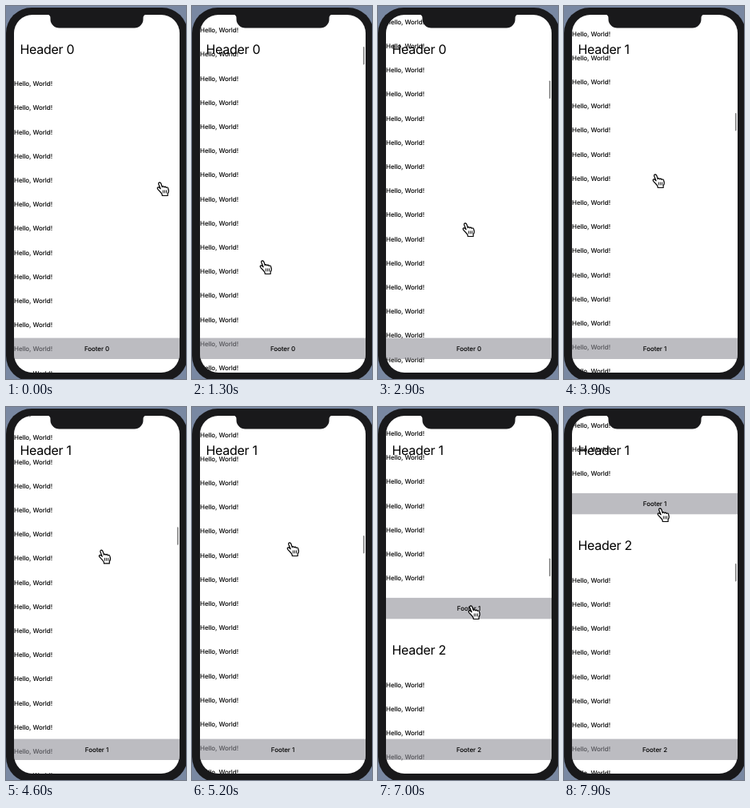
An HTML page with a canvas for the animation above (8000 ms loop, 225 px wide and 467 px high).

```html
<!DOCTYPE html>
<html lang="en">
<head>
<meta charset="utf-8">
<title>Sticky section list</title>
<style>
html, body { margin: 0; width: 225px; height: 467px; overflow: hidden; background: #7988a2; }
canvas { display: block; }
</style>
</head>
<body>
<canvas id="stage" width="225" height="467"></canvas>
<script>
const c = document.getElementById('stage').getContext('2d');
const LOOP = 8000, ROW = 30.2, ROWS = 50, SECTION = ROW * ROWS + 103.3;
const HEADER_Y = 53.3, FOOTER_Y = 429;

// Key poses; the motion between them is smooth
const poses = [
  { t: 0, scroll: 0, x: 196.5, y: 229.5 },
  { t: 800, scroll: 0, x: 95, y: 390 },
  { t: 1300, scroll: 187.8, x: 92.5, y: 327.5 },
  { t: 2900, scroll: 1043.8, x: 113.5, y: 280.5 },
  { t: 3900, scroll: 1857.2, x: 118.5, y: 219.5 },
  { t: 5200, scroll: 2400.8, x: 126.5, y: 178.5 },
  { t: 7000, scroll: 2976.1, x: 120.5, y: 257.5 },
  { t: 7900, scroll: 3107.1, x: 124.5, y: 135.5 }
];

// Cubic interpolation of one property, with central-difference slopes
function at(key, t) {
  const last = poses.length - 1;
  const slope = i => {
    const a = poses[Math.max(0, i - 1)], b = poses[Math.min(last, i + 1)];
    return (b[key] - a[key]) / (b.t - a.t);
  };
  const i = poses.findLastIndex(p => p.t <= t);
  if (i === last) return poses[last][key];
  const p = poses[i], q = poses[i + 1], d = q.t - p.t, u = (t - p.t) / d, v = 1 - u;
  return v * v * (1 + 2 * u) * p[key] + u * u * (3 - 2 * u) * q[key]
    + d * u * v * (v * slope(i) - u * slope(i + 1));
}

function box(x, y, w, h, r) {
  const path = new Path2D();
  path.roundRect(x, y, w, h, r);
  return path;
}

const phone = box(0, 2, 227, 468, 32);
const screen = box(10, 11, 207, 448, 23);
const notch = box(55.5, 5, 116, 22.5, [0, 0, 11, 11]);
notch.addPath(new Path2D('M51.5 10.5 H175.5 Q171.5 11 171.5 15 H55.5 Q55.5 11 51.5 10.5 Z'));
const hand = new Path2D('M-2.5 4.5 L-6.8 -.2 Q-8 -2.2 -6.2 -2.6 Q-5 -2.8 -3.4 -.7 L-5.8 -6.6 Q-6 -8.6 -4.4 -8.7 Q-3.2 -8.7 -2.7 -7.2 L-1.2 -2.8 Q-.2 -5 1.2 -2.6 Q2.6 -4.6 3.7 -2 Q5.6 -3.4 6.2 -1 Q7.6 2.6 5.6 5.4 V8 H-1.2 Q-1 6.2 -2.5 4.5 Z');
const fingers = new Path2D('M-.2 1 V4.8 M1.9 1 V4.8 M4 1 V4.8');

function fill(color, path) {
  c.fillStyle = color;
  c.fill(path);
}

function text(label, x, y, font, spacing, align = 'left') {
  c.font = font + ' Inter, "Liberation Sans", sans-serif';
  c.letterSpacing = spacing + 'px';
  c.textAlign = align;
  c.textRendering = 'geometricPrecision';
  c.fillStyle = '#000';
  c.fillText(label, x, y);
}

function drawRows(top) {
  for (let j = 0; j < ROWS; j++) {
    const y = top + 43.7 + j * ROW;
    if (y > 0 && y < 475) text('Hello, World!', 10, y + 3.2, '500 8px', -0.08);
  }
}

function drawFooter(s, top) {
  const y = Math.min(top + SECTION - 51.5, Math.max(FOOTER_Y, top + 42));
  c.fillStyle = 'rgba(142,142,150,.59)';
  c.fillRect(10, y - 13.4, 207, 26.4);
  text('Footer ' + s, 113.5, y + 3, '500 8px', -0.08, 'center');
}

function drawHeader(s, top) {
  const y = Math.max(top, Math.min(HEADER_Y, top + SECTION - 67.5));
  text('Header ' + s, 17.5, y + 6.2, '16px', -0.3);
}

function drawHand(x, y) {
  c.save();
  c.translate(x, y);
  fill('#fff', hand);
  c.strokeStyle = '#000';
  c.lineJoin = 'round';
  c.lineWidth = 1.2;
  c.stroke(hand);
  c.lineWidth = 0.9;
  c.stroke(fingers);
  c.restore();
}

function draw(t) {
  const scroll = Math.max(0, at('scroll', t));
  c.fillStyle = '#7988a2';
  c.fillRect(0, 0, 225, 467);
  fill('#19191b', phone);
  fill('#fff', screen);

  c.save();
  c.clip(screen);
  const tops = [0, 1, 2, 3].map(s => HEADER_Y + s * SECTION - scroll);
  tops.forEach(drawRows);
  tops.forEach((top, s) => drawFooter(s, top));
  tops.forEach((top, s) => drawHeader(s, top));
  if (scroll > 0) fill('#858585', box(213.9, 41.6 + scroll * 0.0497, 1.7, 22.5, 0.8));
  c.restore();

  fill('#19191b', notch);
  drawHand(at('x', t), at('y', t));
}

function frame() {
  draw(Math.floor(performance.now() % LOOP / 100) * 100);
  requestAnimationFrame(frame);
}
frame();
</script>
</body>
</html>
```
